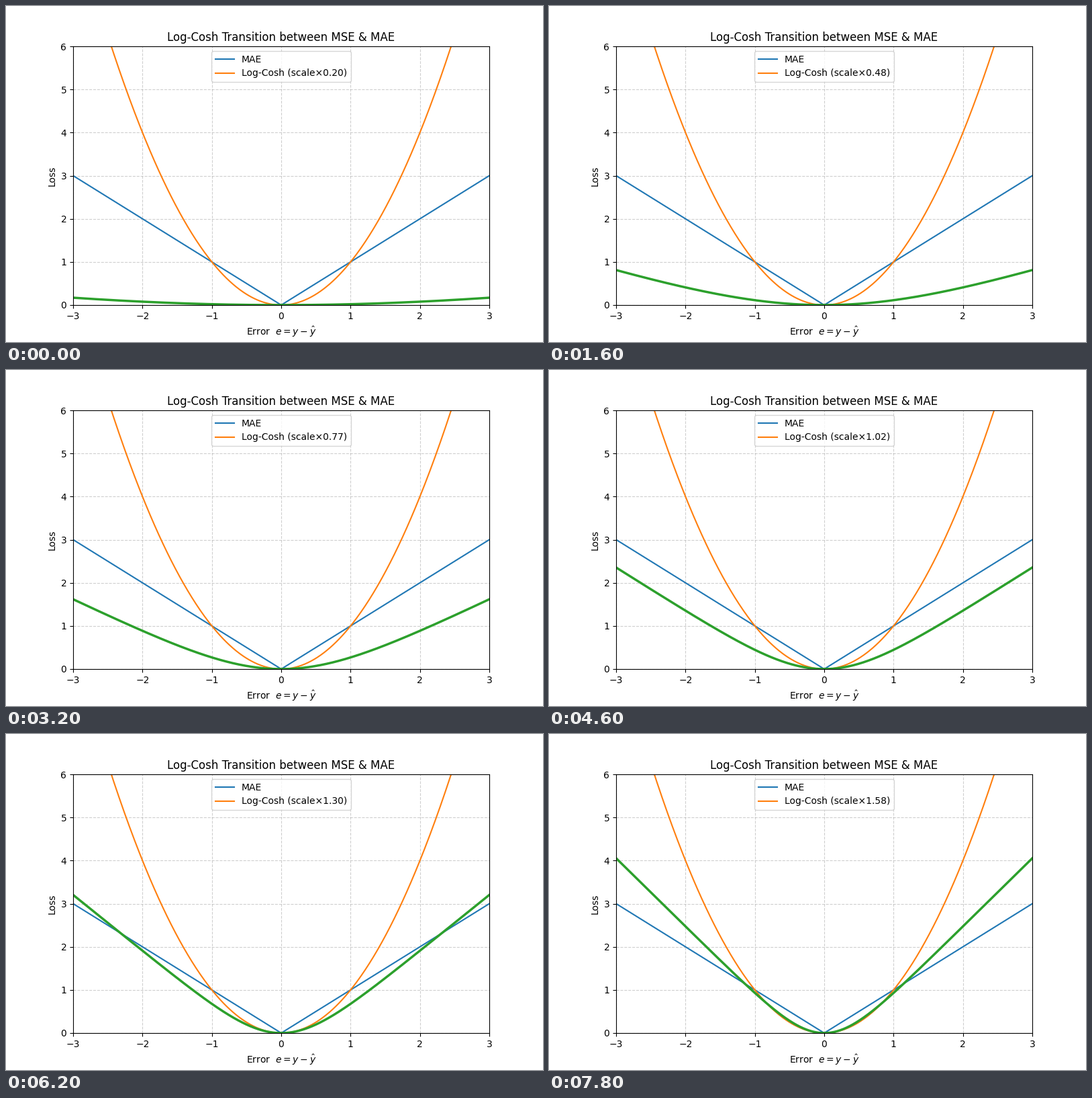
Write a matplotlib script that moves like this. It is 800 px wide and 500 px high and loops after 8000 ms.

```python
import numpy as np
import matplotlib.pyplot as plt
from matplotlib.animation import FuncAnimation

FRAMES = 40
INTERVAL = 200
SCALES = np.linspace(0.2, 3.0, 80)[:FRAMES]

error = np.linspace(-3, 3, 400)

fig, ax = plt.subplots(figsize=(8, 5), dpi=100)
ax.set_xlim(-3, 3)
ax.set_ylim(0, 6)
ax.set_title("Log-Cosh Transition between MSE & MAE")
ax.set_xlabel(r"Error  $e = y - \hat{y}$")
ax.set_ylabel("Loss")
ax.grid(True, linestyle="--", alpha=0.6)

mae_line, = ax.plot(error, np.abs(error), color="C0", lw=1.5)
mse_line, = ax.plot(error, error**2, color="C1", lw=1.5)
cosh_line, = ax.plot([], [], color="C2", lw=2.5)

legend = ax.legend([mae_line, mse_line],
                   ["MAE", f"Log-Cosh (scale×{SCALES[0]:.2f})"],
                   loc="upper center")
scale_label = legend.get_texts()[1]


def update(i):
    scale = SCALES[i]
    cosh_line.set_data(error, np.log(np.cosh(scale * error)))
    scale_label.set_text(f"Log-Cosh (scale×{scale:.2f})")
    return cosh_line, scale_label


anim = FuncAnimation(fig, update, frames=FRAMES, interval=INTERVAL,
                     repeat=True, repeat_delay=0, blit=False)
plt.show()
```
